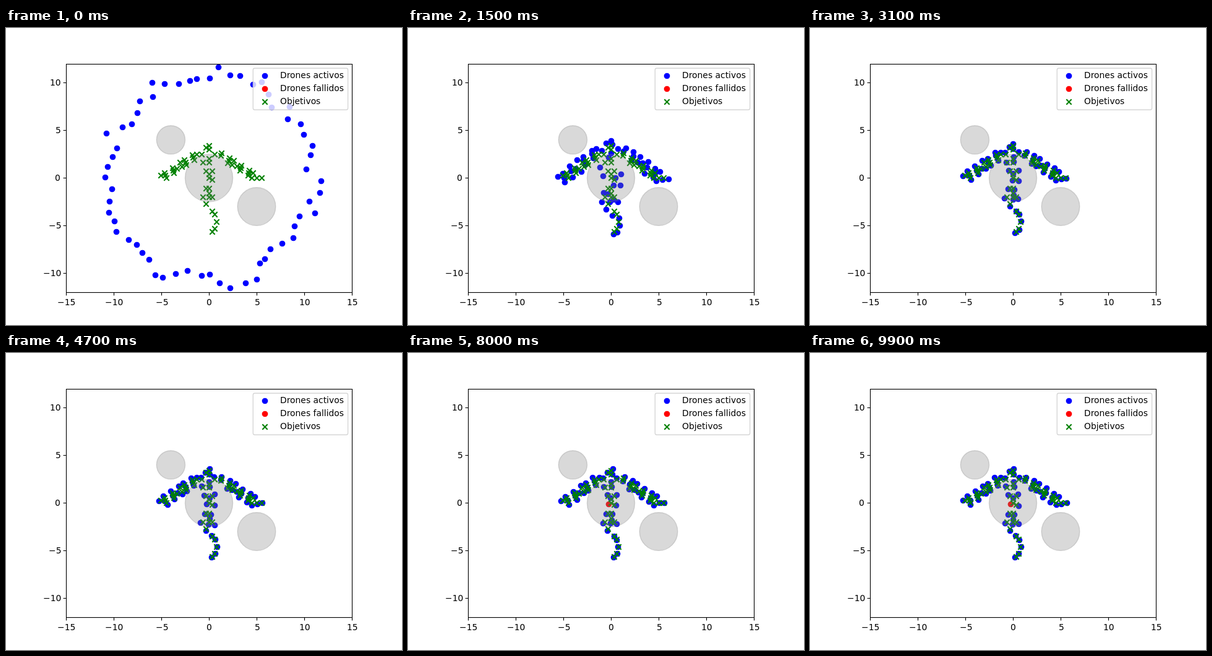
An HTML page with a canvas that plays this animation: 640x480 px, repeating every 10 s.

```html
<!DOCTYPE html>
<html lang="es">
<head>
<meta charset="utf-8">
<style>
html, body { margin: 0; width: 100%; height: 100%; overflow: hidden; background: #fff; }
canvas { display: block; }
</style>
</head>
<body>
<canvas id="stage" width="640" height="480"></canvas>
<script>
const ctx = document.getElementById('stage').getContext('2d');
const STEP = 100, STEPS = 100, FAIL = 50, UNIT = 15.4;
const PULL = 0.17, PUSH = 0.06, REACH = 1, SHAKE = 0.035;
const X = x => 328 + UNIT * x, Y = y => 242.4 - UNIT * y;
const obstacles = [[0, 0, 2.5], [-4, 4, 1.5], [5, -3, 2]];

let seed = 7;
function random(min, max) {
  seed = (seed * 16807) % 2147483647;
  return min + (max - min) * seed / 2147483647;
}

// Ribs of three along a straight spine that starts at the tip, and loose points between them
function wing(side, x, y, slope) {
  const at = (s, dx, dy) => [x - side * (s - dx), y + slope * s + dy];
  const ribs = [0, 0.84, 2.1, 2.94].flatMap(s => [1, 0, -1].map(j => at(s, 0.09 * j, 0.26 * j)));
  const loose = [[-0.48, 0.3], [1.22, -0.05], [1.58, 0.34], [1.75, -0.26]].map(([s, dy]) => at(s, 0, dy));
  return [...loose, ...ribs];
}
const column = (x, ...ys) => ys.map(y => [x, y]);
const row = (y, ...xs) => xs.map(x => [x, y]);
const tail = [46, 31, 0, -30, -46].map(deg => {
  const a = deg * Math.PI / 180;
  return [-0.72 + 1.5 * Math.cos(a), -4.57 + 1.5 * Math.sin(a)];
});

const goals = [
  ...wing(-1, -4.6, 0.28, 0.653),
  ...wing(1, 4.15, 0.57, 0.61).slice(0, -1),
  ...row(2.5, -1.3, -0.8, 0.58),
  ...row(0, 4.5, 5, 5.5),
  ...column(0, 3.4, 3, 2.05, 1.65, 0.4, 0, -1.1, -1.6, -2),
  ...column(-0.3, 3.2, 0.75, -1.1, -2.7),
  ...column(0.33, 0.75, -0.17, -2),
  ...column(-0.65, 1.65, -2),
  ...tail
];
const FAILED = goals.findIndex(([x, y]) => x === 0 && y === 0);

const ring = goals.map((_, i) => {
  const a = (6 * i + random(-1.5, 1.5)) * Math.PI / 180, r = random(9.8, 11.9);
  return [r * Math.cos(a), r * Math.sin(a)];
});

// Swap starts until no swap shortens the total way
function assign(from, to) {
  const start = from.slice();
  const way = (a, b) => Math.hypot(start[a][0] - to[b][0], start[a][1] - to[b][1]);
  for (let better = true; better;) {
    better = false;
    for (let i = 0; i < start.length; i++) for (let j = 0; j < i; j++) {
      if (way(i, j) + way(j, i) < way(i, i) + way(j, j) - 1e-6) {
        [start[i], start[j]] = [start[j], start[i]];
        better = true;
      }
    }
  }
  return start;
}

// Each drone is drawn to its goal and pushed off by close neighbours and obstacles
function advance(drones, k) {
  return drones.map(([x, y], i) => {
    if (k > FAIL && i === FAILED) return [x, y];
    let fx = goals[i][0] - x, fy = goals[i][1] - y;
    drones.forEach(([u, v], j) => {
      const d = Math.max(Math.hypot(x - u, y - v), 0.15);
      if (j === i || d > REACH) return;
      fx += PUSH * (x - u) / (d * d);
      fy += PUSH * (y - v) / (d * d);
    });
    for (const [u, v, r] of obstacles) {
      const d = Math.max(Math.hypot(x - u, y - v), 0.1);
      if (d > r + 0.5) continue;
      fx += 0.15 * (x - u) / d;
      fy += 0.15 * (y - v) / d;
    }
    return [x + PULL * fx + random(-SHAKE, SHAKE), y + PULL * fy + random(-SHAKE, SHAKE)];
  });
}

const poses = [assign(ring, goals)];
for (let k = 1; k < STEPS; k++) poses.push(advance(poses[k - 1], k));

const snap = v => Math.round(v) + 0.5;

function dot(x, y, color) {
  ctx.fillStyle = color;
  ctx.beginPath();
  ctx.arc(snap(x), snap(y), 4.86, 0, 7);
  ctx.fill();
}

function line(x1, y1, x2, y2) {
  ctx.beginPath();
  ctx.moveTo(x1, y1);
  ctx.lineTo(x2, y2);
  ctx.stroke();
}

function cross(x, y) {
  const r = 4.17, cx = snap(x), cy = snap(y);
  ctx.strokeStyle = '#008000';
  ctx.lineWidth = 2.08;
  line(cx - r, cy - r, cx + r, cy + r);
  line(cx - r, cy + r, cx + r, cy - r);
}

function obstacle([x, y, r]) {
  ctx.fillStyle = ctx.strokeStyle = 'rgba(128,128,128,0.3)';
  ctx.lineWidth = 1.39;
  ctx.beginPath();
  ctx.arc(X(x), Y(y), r * UNIT, 0, 7);
  ctx.fill();
  ctx.stroke();
}

// Aligned by ink width, with the ink starting on a whole pixel
function label(text, x, y, align) {
  ctx.fillStyle = '#000';
  const m = ctx.measureText(text), bearing = -m.actualBoundingBoxLeft;
  const left = x - align * (m.actualBoundingBoxRight - bearing);
  ctx.fillText(text, Math.round(left + bearing) - bearing, y);
}

function axes() {
  const name = v => String(v).replace('-', '\u2212');
  ctx.strokeStyle = '#000';
  ctx.lineWidth = 1.11;
  ctx.strokeRect(97.5, 58.5, 462, 369);
  for (let v = -15; v <= 15; v += 5) {
    line(snap(X(v)), 428, snap(X(v)), 432.4);
    label(name(v), X(v), 448, 0.5);
    if (Math.abs(v) > 10) continue;
    line(92.6, snap(Y(v)), 97, snap(Y(v)));
    label(name(v), 87.3, Math.round(Y(v)) + 5, 1);
  }
}

function legend() {
  ctx.fillStyle = 'rgba(255,255,255,0.8)';
  ctx.strokeStyle = 'rgba(204,204,204,0.8)';
  ctx.lineWidth = 1.39;
  ctx.beginPath();
  ctx.roundRect(399.3, 65, 153.3, 67.3, 2.8);
  ctx.fill();
  ctx.stroke();
  dot(418, 77, '#00f');
  dot(418, 98, '#f00');
  cross(418, 119);
  ['Drones activos', 'Drones fallidos', 'Objetivos'].forEach((t, i) => label(t, 443, 81 + 21 * i, 0));
}

function draw(k) {
  ctx.fillStyle = '#fff';
  ctx.fillRect(0, 0, 640, 480);
  ctx.font = '13.89px "DejaVu Sans", sans-serif';
  ctx.save();
  ctx.beginPath();
  ctx.rect(97, 58, 462, 369);
  ctx.clip();
  const lost = i => k >= FAIL && i === FAILED;
  poses[k].forEach(([x, y], i) => { if (!lost(i)) dot(X(x), Y(y), '#00f'); });
  if (lost(FAILED)) dot(X(poses[k][FAILED][0]), Y(poses[k][FAILED][1]), '#f00');
  goals.forEach(([x, y]) => cross(X(x), Y(y)));
  obstacles.forEach(obstacle);
  ctx.restore();
  axes();
  legend();
}

const begin = performance.now();
function tick() {
  draw(Math.floor((performance.now() - begin) / STEP) % STEPS);
  requestAnimationFrame(tick);
}
tick();
</script>
</body>
</html>
```
